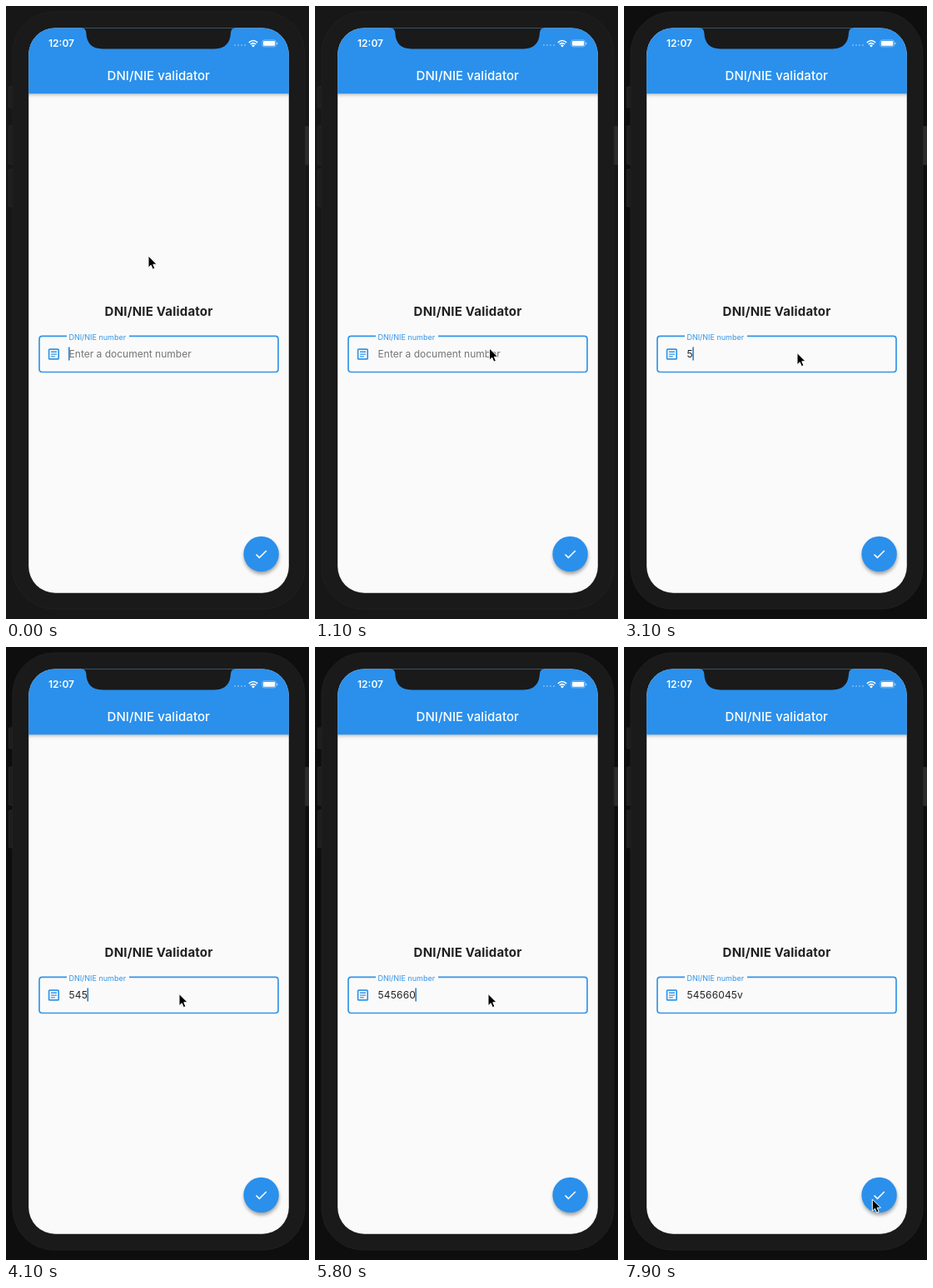
Animation of 364x736 px, one loop 8 s. Source, as an HTML page:

```html
<!DOCTYPE html>
<html lang="en">
<head>
<meta charset="utf-8">
<title>DNI/NIE validator</title>
<style>
  html, body { margin: 0; width: 100%; height: 100%; overflow: hidden; background: #0e0e0e; }
  svg { display: block; width: 364px; height: 736px; font-family: Inter, Roboto, sans-serif; }
  .line { fill: none; stroke: #3395e8; stroke-width: 1.7; }
  .white { fill: #fff; }
  .mid { text-anchor: middle; }
</style>
</head>
<body>
<svg viewBox="0 0 364 736">
  <defs>
    <clipPath id="screen"><rect x="27.2" y="26.4" width="312.6" height="678.4" rx="32"/></clipPath>
    <filter id="soft" x="-30%" y="-30%" width="160%" height="160%"><feGaussianBlur stdDeviation="2"/></filter>
  </defs>

  <!-- phone -->
  <rect id="back" width="364" height="736"/>
  <g fill="#1e1e1e" stroke="#2b2b2b" stroke-width=".8">
    <rect x="3.4" y="97" width="6" height="25" rx="1"/>
    <rect x="3.4" y="144" width="6" height="46" rx="1"/>
    <rect x="3.4" y="196" width="6" height="45" rx="1"/>
    <rect x="358" y="144.5" width="7" height="46" fill="#2c2c2c"/>
    <rect x="8" y="7" width="351" height="717" rx="50" fill="#1a1a1a" stroke="#222"/>
  </g>

  <!-- screen -->
  <g clip-path="url(#screen)">
    <rect x="27" y="26" width="313" height="679" fill="#fafafa"/>
    <rect x="20" y="60" width="327" height="46.5" opacity=".28" filter="url(#soft)"/>
    <rect x="27" y="26" width="313" height="79.2" fill="#2a90ec"/>
    <path d="M89 26Q96 26 96.3 32Q97 51.4 116 51.4H250Q269 51.4 270 32Q270.3 26 277 26Z" fill="#1a1a1a"/>
  </g>

  <!-- status bar -->
  <g class="white">
    <text x="51" y="49.4" font-size="12" font-weight="600">12:07</text>
    <g opacity=".38">
      <circle cx="275" cy="47" r="1"/><circle cx="279" cy="47" r="1"/>
      <circle cx="283" cy="47" r="1"/><circle cx="287" cy="47" r="1"/>
    </g>
    <path d="M297 49.5l-2-2.1q2-1.6 4 0z"/>
    <path d="M291.8 43.8q5.2-4.6 10.4 0M293.7 46q3.3-2.8 6.6 0" fill="none" stroke="#fff" stroke-width="1.6"/>
    <rect x="307.9" y="40.9" width="16.4" height="8" rx="2.2" fill="none" stroke="#fff" stroke-opacity=".5" stroke-width=".8"/>
    <rect x="309" y="42" width="14.2" height="5.8" rx="1.2"/>
    <rect x="325.2" y="43.4" width="1.2" height="3" rx=".6" opacity=".6"/>
    <text class="mid" x="183.2" y="89.4" font-size="15" font-weight="500" letter-spacing=".05">DNI/NIE validator</text>
  </g>

  <!-- form -->
  <text class="mid" x="183.6" y="372.2" font-size="15" font-weight="700" letter-spacing=".2" fill="#212121">DNI/NIE Validator</text>
  <path class="line" d="M73 396.4H43.5Q40 396.4 40 399.9V436Q40 439.5 43.5 439.5H323.5Q327 439.5 327 436V399.9Q327 396.4 323.5 396.4H148"/>
  <text x="75.4" y="400.6" font-size="9" fill="#3395e8">DNI/NIE number</text>
  <rect class="line" x="51.6" y="412.1" width="11.6" height="11.8" rx="1"/>
  <path class="line" style="stroke-width:1.4" d="M54 415.3h7M54 418.1h7M54 420.9h4.8"/>
  <text id="hint" x="75.6" y="421.5" font-size="12" fill="#757575">Enter a document number</text>
  <text id="value" x="75.6" y="421.5" font-size="12" letter-spacing=".15" fill="#212121"></text>
  <rect id="caret" y="409.3" width="1.6" height="16.4" rx=".8" fill="#2b80c8"/>

  <!-- confirm button -->
  <circle cx="307" cy="661" r="21" opacity=".36" filter="url(#soft)"/>
  <circle cx="306.6" cy="657.9" r="21.2" fill="#2a90ec"/>
  <path d="M300.5 658.5l3.9 3.9 8.4-8.4" fill="none" stroke="#fff" stroke-width="1.6"/>

  <path id="pointer" d="M0 0V14.2L3.2 11.2 5.3 16.2 7.9 15.1 5.8 10.2H10.2Z" stroke="#fff" stroke-width="1" stroke-linejoin="round"/>
</svg>
<script>
const $ = id => document.getElementById(id);
const LOOP = 8000, STEP = 100, BLINK = 980;
const typed = '54566045v';
const keyTimes = [2900, 3500, 3900, 4400, 4800, 5600, 5900, 6200, 6300];
// time, x, y of the pointer tip
const path = [
  [0, 171, 300], [1000, 209.5, 411], [1500, 209.5, 411],
  [1800, 208, 416.5], [6700, 208, 416.5], [7100, 298.3, 663], [LOOP, 298.3, 663]
];

const clamp = v => Math.min(1, Math.max(0, v));
const ramp = (t, a, b) => clamp((t - a) / (b - a));
const smooth = u => u * u * (3 - 2 * u);

function pointerAt(t) {
  const i = path.findIndex(p => p[0] > t);
  const [t0, x0, y0] = path[i - 1], [t1, x1, y1] = path[i];
  const u = smooth(ramp(t, t0, t1));
  return [x0 + (x1 - x0) * u, y0 + (y1 - y0) * u];
}

function caretAlpha(age) {
  const p = age % BLINK;
  return 1 - ramp(p, 490, 590) + ramp(p, 900, BLINK);
}

function draw(t) {
  const count = keyTimes.filter(k => k <= t).length;
  $('value').textContent = typed.slice(0, count);
  $('hint').style.display = count ? 'none' : '';
  $('caret').setAttribute('x', 75 + (count ? $('value').getComputedTextLength() : 0));
  $('caret').setAttribute('opacity', caretAlpha(count ? t - keyTimes[count - 1] : t + 480));
  $('pointer').setAttribute('transform', `translate(${pointerAt(t)})`);

  const level = 23 - 9 * ramp(t, 1200, 1800);
  $('back').setAttribute('fill', `rgb(${level},${level},${level})`);
}

function frame() {
  draw(Math.floor(performance.now() % LOOP / STEP) * STEP);
  requestAnimationFrame(frame);
}
frame();
</script>
</body>
</html>
```
